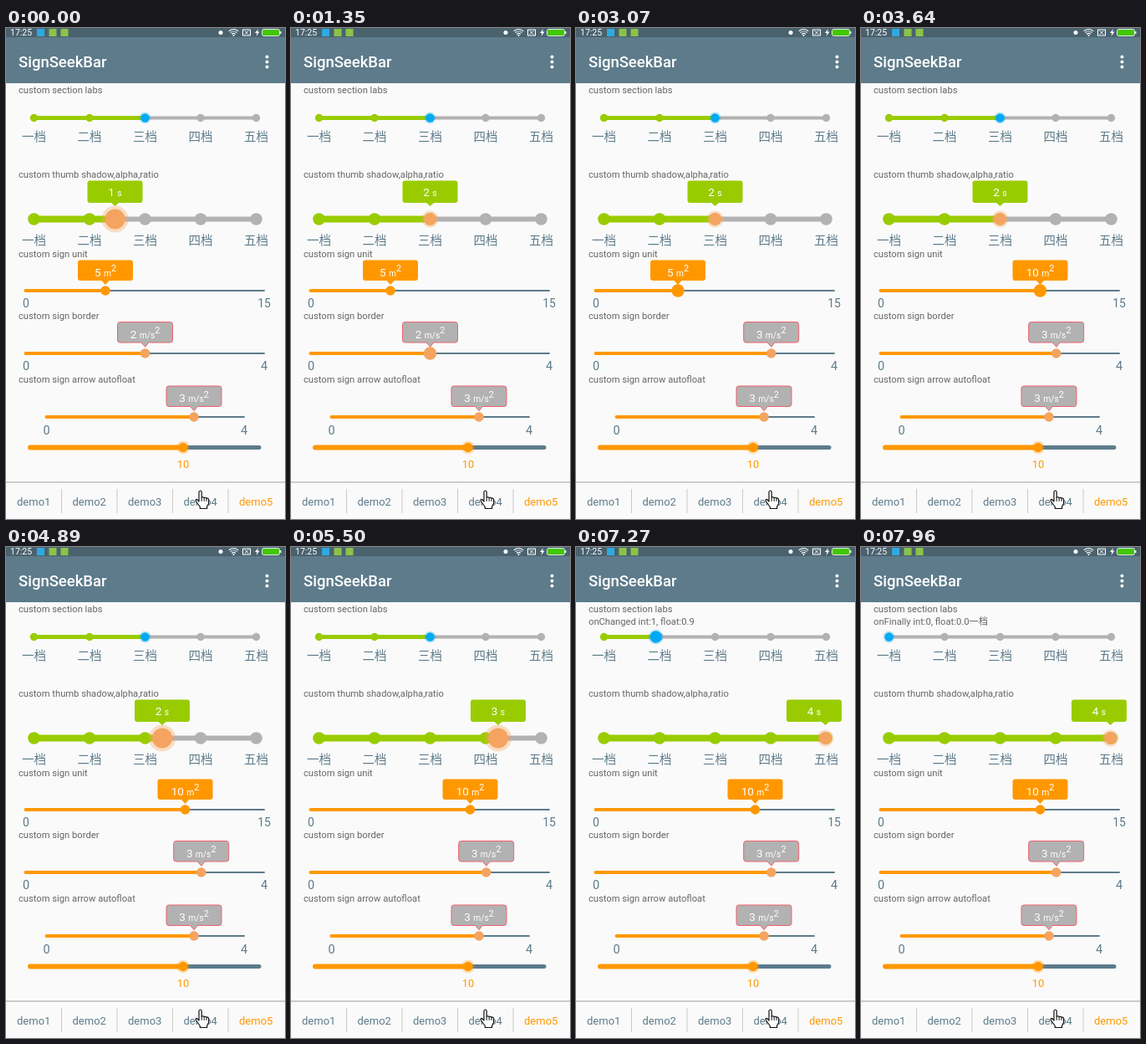
An HTML page with a canvas for the animation above (8 s loop, 334x587 px).

```html
<!DOCTYPE html>
<html>
<head>
<meta charset="utf-8">
<style>
html, body { margin: 0; width: 100%; height: 100%; overflow: hidden; background: #fafafa; }
canvas { display: block; }
</style>
</head>
<body>
<canvas id="stage" width="334" height="587"></canvas>
<script>
const ctx = document.getElementById('stage').getContext('2d');
const LOOP = 8000;
const FONT = 'Roboto, "Noto Sans CJK SC", "Noto Sans CJK", sans-serif';
const SLATE = '#5d7b8a', GREEN = '#99cc00', GRAY = '#b2b2b2', ORANGE = '#ff9800',
      SAND = '#f4a460', BLUE = '#03a9f4', RED = '#f0606c';
const STOPS = [33.5, 100, 166.5, 233, 299.5];
const LABELS = ['一档', '二档', '三档', '四档', '五档'];

// Drag samples: [time, thumb x, pressed]; each holds until the next.
const drags = {
  section: [[0, 166.5, 0], [6820, 168, 1], [6940, 150, 1], [7060, 122, 1], [7270, 95.6, 1],
    [7390, 78, 1], [7510, 62, 1], [7730, 45, 1], [7850, 33.5, 1], [7960, 33.5, 0]],
  shadow: [[0, 130.5, 1], [120, 147, 1], [240, 167, 1], [360, 184, 1], [480, 190, 1], [610, 166.5, 0],
    [4890, 187, 1], [5010, 207, 1], [5130, 217.5, 1], [5380, 230, 1], [5500, 248, 1],
    [5620, 268, 1], [5740, 287, 1], [5860, 298.5, 1], [5980, 298.5, 0]],
  unit: [[0, 119, 0], [3070, 122, 1], [3190, 140, 1], [3300, 163, 1], [3420, 187, 1],
    [3530, 206, 1], [3640, 214.5, 1], [4890, 214.5, 0]],
  border: [[0, 166.5, 0], [1350, 166.5, 1], [1470, 175, 1], [1590, 194, 1], [1720, 215, 1],
    [1840, 231, 1], [1960, 236.5, 1], [2090, 233.7, 1], [2330, 233.7, 0]]
};

function sample(keys, t) {
  const [, x, pressed] = keys.findLast(k => k[0] <= t);
  return { x, pressed };
}

function text(str, x, y, size, color, align = 'left', weight = 400) {
  ctx.font = `${weight} ${size}px ${FONT}`;
  ctx.textAlign = align;
  ctx.fillStyle = color;
  ctx.fillText(str, x, y);
}

function line(x1, y1, x2, y2, width, color, cap = 'round') {
  ctx.beginPath();
  ctx.moveTo(x1, y1);
  ctx.lineTo(x2, y2);
  ctx.lineWidth = width;
  ctx.lineCap = cap;
  ctx.strokeStyle = color;
  ctx.stroke();
}

function dot(x, y, r, color, alpha = 1) {
  ctx.globalAlpha = alpha;
  ctx.beginPath();
  ctx.arc(x, y, r, 0, 7);
  ctx.fillStyle = color;
  ctx.fill();
  ctx.globalAlpha = 1;
}

function rect(x, y, w, h, color) {
  ctx.fillStyle = color;
  ctx.fillRect(x, y, w, h);
}

function track(y, from, to, x, done, doneWidth, rest, restWidth) {
  line(x, y, to, y, restWidth, rest);
  line(from, y, x, y, doneWidth, done);
}

function sectionTrack(y, x, doneWidth, restWidth, tick) {
  track(y, STOPS[0], STOPS[4], x, GREEN, doneWidth, GRAY, restWidth);
  STOPS.forEach((s, i) => {
    dot(s, y, tick, s <= x + 1 ? GREEN : GRAY);
    text(LABELS[i], s, y + (tick > 6 ? 30.5 : 27), 14.5, SLATE, 'center');
  });
}

function sign(thumbX, top, height, tip, fill, border, value, unit, power = '') {
  const x = Math.min(thumbX, 285), left = x - 33, right = x + 33, bottom = top + height, r = 3;
  ctx.beginPath();
  ctx.moveTo(thumbX, tip);
  ctx.lineTo(thumbX - 4.5, bottom);
  ctx.arcTo(left, bottom, left, top, r);
  ctx.arcTo(left, top, right, top, r);
  ctx.arcTo(right, top, right, bottom, r);
  ctx.arcTo(right, bottom, left, bottom, r);
  ctx.lineTo(thumbX + 4.5, bottom);
  ctx.closePath();
  ctx.fillStyle = fill;
  ctx.fill();
  if (border) {
    ctx.lineWidth = 1;
    ctx.strokeStyle = border;
    ctx.stroke();
  }
  const base = top + (power ? 19 : 18);
  const parts = [[value + ' ', 13.5, 0], [unit, 10.3, 0], [power, 10.8, -5.5]];
  const width = ([s, size]) => (ctx.font = `${size}px ${FONT}`, ctx.measureText(s).width);
  let pen = x - parts.reduce((sum, p) => sum + width(p), 0) / 2;
  for (const p of parts) {
    text(p[0], pen, base + p[2], p[1], '#fff');
    pen += width(p);
  }
}

function statusBar() {
  rect(0, 0, 334, 66, SLATE);
  rect(0, 0, 334, 11, '#4a626e');
  text('17:25', 5, 9.3, 10.5, '#fff');
  [[37, '#2fa9e0'], [51.5, '#8bc34a'], [65.5, '#8bc34a']].forEach(([x, c]) => rect(x, 1, 9, 9, c));
  dot(257, 5.5, 2.5, '#fff');
  ctx.strokeStyle = '#fff';
  ctx.lineWidth = 1.1;
  for (const r of [3, 5.5, 8]) {
    ctx.beginPath();
    ctx.arc(272.5, 9.5, r, -2.3, -0.84);
    ctx.stroke();
  }
  dot(272.5, 9, 1, '#fff');
  ctx.strokeRect(283.5, 2, 9, 7);
  line(286, 3.5, 290, 7.5, 1, '#fff');
  line(290, 3.5, 286, 7.5, 1, '#fff');
  ctx.fillStyle = '#fff';
  ctx.fill(new Path2D('M302 1l-4 5h2.5l-1 4 4-5.5h-2.5z'));
  ctx.strokeStyle = '#e4ebee';
  ctx.lineWidth = 1;
  ctx.beginPath();
  ctx.roundRect(306.5, 1.5, 21, 8, 2);
  ctx.fillStyle = '#43c700';
  ctx.fill();
  ctx.stroke();
  rect(328, 4, 1.5, 3, '#e4ebee');
  text('SignSeekBar', 15, 47, 18.5, '#fff', 'left', 500);
  [34.5, 40.5, 46.5].forEach(y => dot(312.5, y, 2, '#fff'));
}

function tabs() {
  line(0, 543, 334, 543, 1.6, '#bdbdbd', 'butt');
  STOPS.forEach((x, i) => {
    text('demo' + (i + 1), x - 0.3, 571, 13, i === 4 ? ORANGE : SLATE, 'center');
    if (i) line(x - 33.5, 551, x - 33.5, 580, 1, '#c9c9c9', 'butt');
  });
}

const hand = new Path2D('M231 554.5q1.7-3 3.2 0v7q1.6-1.6 3 .3 1.7-1.3 2.8.5 2.2-.9 2.6 1.6v4.6l-2 3.8v2.2h-8.3v-2l-4.8-6.5q-1.4-2.7 1-2.5l2.5 2.5z');
function cursor() {
  ctx.fillStyle = '#fff';
  ctx.fill(hand);
  ctx.strokeStyle = '#111';
  ctx.lineWidth = 1.2;
  ctx.lineJoin = 'round';
  ctx.stroke(hand);
  [234.2, 237.2, 240].forEach(x => line(x, 562, x, 565.5, 1, '#111'));
}

function sectionMessage(t, x) {
  if (t < 6820) return;
  const value = (x - STOPS[0]) / 66.5;
  const event = t < 7960 ? 'onChanged' : 'onFinally';
  const label = t < 7960 ? '' : LABELS[0];
  text(`${event} int:${Math.round(value)}, float:${value.toFixed(1)}${label}`, 15, 93.3, 11.2, '#666');
}

function draw(t) {
  rect(0, 0, 334, 587, '#fafafa');
  statusBar();
  [['section labs', 78.3], ['thumb shadow,alpha,ratio', 179.3], ['sign unit', 274.3],
   ['sign border', 347.8], ['sign arrow autofloat', 424.3]]
    .forEach(([s, y]) => text('custom ' + s, 15, y, 11.2, '#666'));

  const section = sample(drags.section, t);
  sectionMessage(t, section.x);
  sectionTrack(107.5, section.x, 5, 4, 4.7);
  dot(section.x, 107.5, section.pressed ? 9 : 7, BLUE, 0.25);
  dot(section.x, 107.5, section.pressed ? 7.2 : 5.2, BLUE);

  const shadow = sample(drags.shadow, t);
  sectionTrack(228.5, shadow.x, 8, 6, 7.3);
  dot(shadow.x, 228.5, shadow.pressed ? 16 : 10, SAND, 0.35);
  dot(shadow.x, 228.5, shadow.pressed ? 12 : 7.5, SAND);
  sign(shadow.x, 182.5, 26.5, 213, GREEN, null, Math.round((shadow.x - STOPS[0]) / 66.5), 's');

  const unit = sample(drags.unit, t);
  track(314, 23.5, 309, unit.x, ORANGE, 4, SLATE, 2);
  dot(unit.x, 314, unit.pressed ? 7.7 : 5.8, ORANGE);
  sign(unit.x, 277.5, 24.5, 307, ORANGE, null, Math.round((unit.x - 24) / 19), 'm', '2');
  text('0', 24, 333.5, 14, SLATE, 'center');
  text('15', 309, 333.5, 14, SLATE, 'center');

  const border = sample(drags.border, t);
  track(389, 23.5, 309, border.x, ORANGE, 4, SLATE, 2);
  dot(border.x, 389, border.pressed ? 7.7 : 5.8, SAND);
  sign(border.x, 351.5, 24.5, 381, GRAY, RED, Math.round((border.x - 24) / 71.25), 'm/s', '2');
  text('0', 24, 409, 14.5, SLATE, 'center');
  text('4', 309, 409, 14.5, SLATE, 'center');

  track(465, 48.5, 285, 225, ORANGE, 4, SLATE, 2);
  dot(225, 465, 5.8, SAND);
  sign(225, 428, 24.5, 457.5, GRAY, RED, 3, 'm/s', '2');
  text('0', 48.5, 485.5, 14.5, SLATE, 'center');
  text('4', 285, 485.5, 14.5, SLATE, 'center');

  track(501.5, 29, 303, 212, ORANGE, 6, SLATE, 5);
  dot(212, 501.5, 8, ORANGE, 0.25);
  dot(212, 501.5, 5.7, ORANGE);
  text('10', 212, 526, 13, ORANGE, 'center');

  tabs();
  cursor();
}

const start = performance.now();
function tick() {
  draw((performance.now() - start) % LOOP);
  requestAnimationFrame(tick);
}
tick();
</script>
</body>
</html>
```
